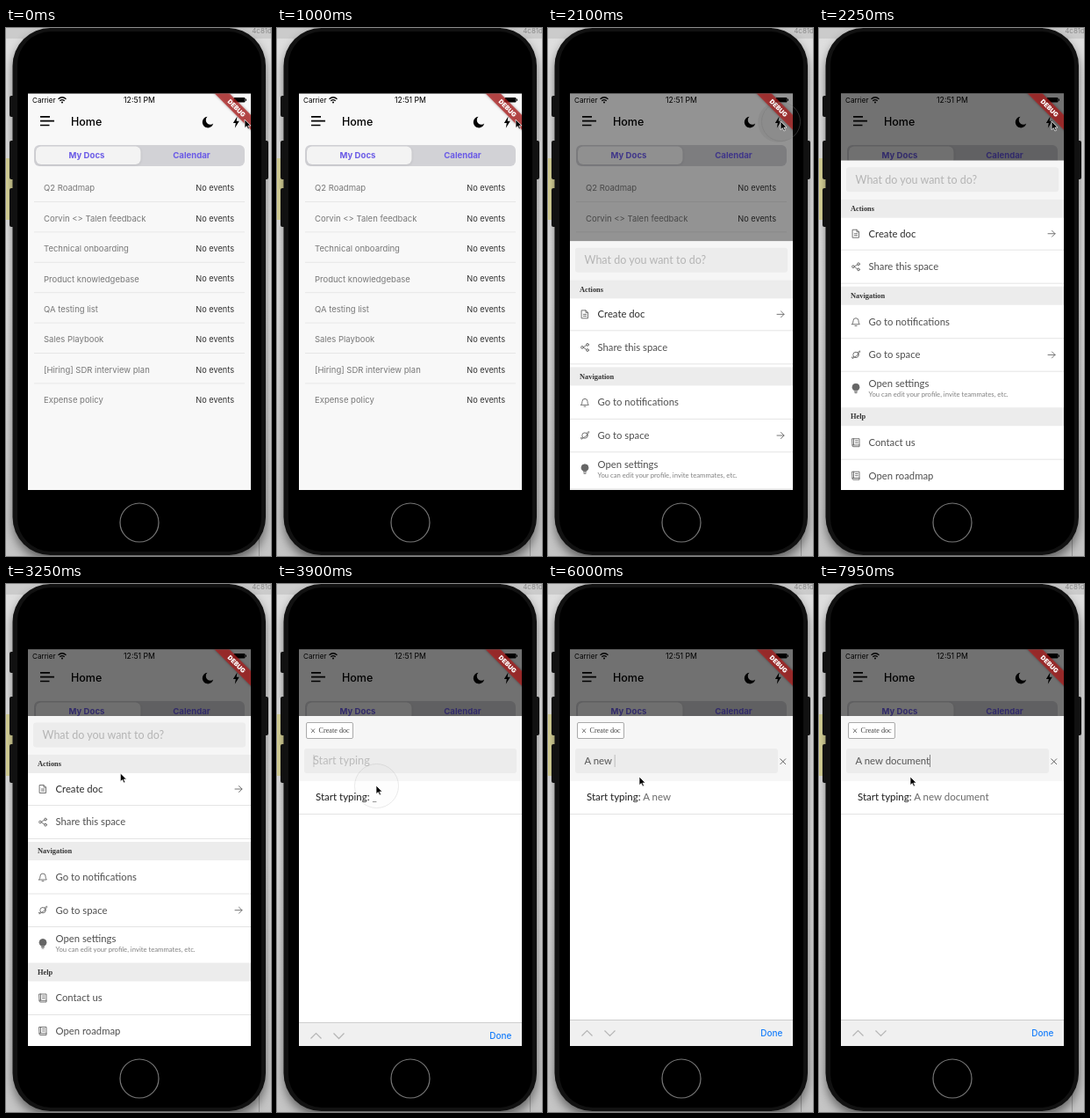
Write an HTML page that moves like this. It is 302 px wide and 600 px high and loops after 8000 ms.

```html
<!DOCTYPE html>
<html lang="en">
<head>
<meta charset="utf-8">
<title>Command sheet</title>
<style>
  html, body { margin: 0; width: 100%; height: 100%; overflow: hidden; background: #ddd; }
  svg { display: block; width: 302px; height: 600px; }
  text { font-family: Inter, sans-serif; white-space: pre; }
  .sheet text { font-family: Lato, sans-serif; }
  .sheet .serif { font-family: "Liberation Serif", serif; }
  .icon { fill: none; stroke: #666; stroke-width: .9; stroke-linejoin: round; stroke-linecap: round; }
</style>
</head>
<body>
<svg viewBox="0 0 302 600">
  <defs>
    <clipPath id="screenClip"><rect x="25" y="74.500" width="254" height="450.500"/></clipPath>
    <linearGradient id="desk" x2="0" y2="1">
      <stop offset="0" stop-color="#dedede"/><stop offset=".5" stop-color="#e2e2e2"/><stop offset="1" stop-color="#c4c4c4"/>
    </linearGradient>
    <filter id="blur" x="-20%" y="-20%" width="140%" height="140%"><feGaussianBlur stdDeviation="6"/></filter>
    <filter id="soft" x="-20%" y="-60%" width="140%" height="220%"><feGaussianBlur stdDeviation="1.5"/></filter>
  </defs>

  <!-- desktop and phone body -->
  <rect width="302" height="600" fill="url(#desk)"/>
  <rect width="302" height="12" fill="#cbcbcb"/>
  <rect y="148" width="8" height="70" fill="#dcd79b"/>
  <path d="M288.5 560V600" stroke="#999"/>
  <text x="303" y="6" font-size="8" fill="#888" text-anchor="end">4c81d</text>
  <rect x="8" y="6" width="288" height="600" rx="44" fill="#000" opacity=".5" filter="url(#blur)"/>
  <path d="M4 79q0-2 2-2h4v24H6q-2 0-2-2zM4 130q0-2 2-2h4v44H6q-2 0-2-2zM4 184q0-2 2-2h4v44H6q-2 0-2-2zM294 128h3q2 0 2 2v40q0 2-2 2h-3z" fill="#111"/>
  <rect x="7.500" y="0" width="288.500" height="599" rx="43" fill="#111"/>
  <rect x="13" y="4" width="278" height="591" rx="38" fill="#000"/>
  <circle cx="152" cy="562" r="22" fill="none" stroke="#777" stroke-width="1.2"/>

  <g clip-path="url(#screenClip)">
    <rect x="25" y="74" width="254" height="451" fill="#f8f8f8"/>
    <g id="home"></g>
    <circle id="splash" cx="262" cy="107" r="23" fill="#000"/>
    <rect id="dim" x="25" y="74" width="254" height="451"/>
    <g id="sheet" class="sheet">
      <rect x="25" y="0" width="254" height="400" fill="#fff"/>
      <g id="actions"></g>
      <g id="editor"></g>
    </g>
    <g id="accessory">
      <rect x="25" y="0" width="254" height="31" fill="#f0f0f0"/>
      <path d="M25 .5H279" stroke="#cdcdcd"/>
      <path d="M38.500 18.500l6-6 6 6M64.500 12.500l6 6 6-6" fill="none" stroke="#b5b5b5" stroke-width="1.2"/>
      <text x="267.500" y="19" font-size="10" font-weight="500" fill="#157dfb" text-anchor="end">Done</text>
    </g>
    <g transform="translate(262.800 91) rotate(45)">
      <rect x="-40" y="-6" width="80" height="12" opacity=".35" filter="url(#soft)"/>
      <rect x="-40" y="-6" width="80" height="12" fill="#b71c1c" opacity=".7"/>
      <text y="2.600" font-size="7.200" font-weight="900" fill="#fff" text-anchor="middle">DEBUG</text>
    </g>
  </g>

  <circle id="ring" fill="#888" fill-opacity=".06"/>
  <path id="cursor" d="M0 0V9.600L2.300 7.600L3.900 11L5.500 10.300L3.900 7H7Z" stroke="#fff" stroke-width=".7"/>
</svg>

<script>
const $ = id => document.getElementById(id);
const clamp = v => Math.max(0, Math.min(1, v));
const progress = (t, start, length) => clamp((t - start) / length);
const easeOut = (p, power) => 1 - (1 - p) ** power;
const easeInOut = p => p * p * (3 - 2 * p);

// Text placed by its vertical centre
const label = (x, middle, size, string, attrs = '') =>
  `<text x="${x}" y="${middle + size * .35}" font-size="${size}" ${attrs}>${string}</text>`;
const rule = (y, x1, x2, color) => `<path d="M${x1} ${y}H${x2}" stroke="${color}" stroke-width=".8"/>`;
const box = (x, y, w, h, fill, attrs = '') =>
  `<rect x="${x}" y="${y}" width="${w}" height="${h}" fill="${fill}" ${attrs}/>`;

const docs = ['Q2 Roadmap', 'Corvin &lt;&gt; Talen feedback', 'Technical onboarding', 'Product knowledgebase',
  'QA testing list', 'Sales Playbook', '[Hiring] SDR interview plan', 'Expense policy'];

$('home').innerHTML =
  label(30, 82, 8.1, 'Carrier') + label(152, 82, 8.7, '12:51 PM', 'text-anchor="middle"') +
  `<path d="M59.500 80.800q4.500-4 9 0M61.300 82.800q2.700-2.400 5.400 0" fill="none" stroke="#000" stroke-width="1.3"/>
   <circle cx="64" cy="84.500" r="1"/>` +
  box(259.5, 79, 13, 5.5, '#000', 'rx="1.300"') + box(273, 80.6, 1, 2.2, '#000') +
  `<path d="M39 100.900H50M39 105.700H55M39 110.500H49.500" stroke="#000" stroke-width="1.700"/>` +
  label(74, 107.1, 12.5, 'Home', 'font-weight="500"') +
  `<path d="M229.500 100.800A6.300 6.300 0 1 0 236.200 108.500A4.700 4.700 0 0 1 229.500 100.800Z"/>
   <path d="M263.500 100.500L258.800 108H261.800L260.800 113.800L265.800 105.800H262.700Z"/>` +
  box(32, 133, 240, 24, '#d2d2d6', 'rx="6"') +
  box(34, 135, 120, 21, '#000', 'rx="6" opacity=".08" filter="url(#soft)"') +
  box(34, 134.5, 119.5, 20.5, '#f3f3f3', 'rx="6"') +
  ['My Docs', 'Calendar'].map((s, i) =>
    label(92 + i * 119.5, 144.7, 9.6, s, 'font-weight="700" fill="#6a5ae6" text-anchor="middle"')).join('') +
  docs.map((title, i) => {
    const y = 182 + i * 34.4;
    return label(43, y, 9.5, title, 'fill="#787878"') +
      label(260, y, 9.2, 'No events', 'fill="#333" text-anchor="end"') +
      (i < docs.length - 1 ? rule(y + 15.5, 32, 272, '#e3e3e3') : '');
  }).join('');

const icons = {
  doc: '<path d="M-3.500-4.500H1L3.500-2V4.500H-3.500ZM1-4.500V-2H3.500M-1.700 0H1.700M-1.700 2H1.700"/>',
  share: '<path d="M2-2.500L-2 0L2 2.800"/><circle cx="3" cy="-3" r="1.400"/><circle cx="-3" r="1.400"/><circle cx="3" cy="3.200" r="1.400"/>',
  bell: '<path d="M-4.300 3H4.300Q3 1.800 3-1A3 3 0 0 0-3-1Q-3 1.800-4.300 3ZM-1 4.700H1"/>',
  planet: '<circle r="3.200"/><path d="M-2.600 2Q-5.500 5-4.500 2.500M2-2.600Q5.500-6 4.600-3.400Q2.500 1-3.800 4.200"/>',
  bulb: '<path d="M-2 2Q-4 .5-4-1.500A4 4 0 0 1 4-1.500Q4 .5 2 2Z" fill="#666"/><path d="M-1.500 3.500H1.500M-1 5H1"/>',
  book: '<path d="M-4-4.500H4V4.500H-3Q-4 4.500-4 3.500ZM-4 2.700H4M-2.500-4.500V2.500M-.5-2.300H2.300M-.5 0H2.300"/>'
};
const arrow = y => `<path class="icon" d="M261 ${y}H269M265.500 ${y - 3.5}L269 ${y}L265.500 ${y + 3.5}"/>`;
const section = (y, title) => box(25, y, 254, 21, '#ececec') +
  label(36, y + 10.3, 8.4, title, 'class="serif" font-weight="700" fill="#333"');
const action = (y, icon, title, { color = '#505050', more = false, iconY = y } = {}) =>
  `<g class="icon" transform="translate(42 ${iconY})">${icons[icon]}</g>` +
  label(56.5, y, 11.3, title, `fill="${color}"`) + (more ? arrow(y) : '');
const divider = y => rule(y, 25, 279, '#dedede');

// Sheet content is measured from the top of the sheet
$('actions').innerHTML =
  box(25, 0, 254, 44, '#f6f6f6') + box(31, 7.5, 242, 28, '#ececec', 'rx="3"') +
  label(41.5, 21.5, 12.5, 'What do you want to do?', 'fill="#b4b4b4"') +
  section(44, 'Actions') +
  action(83, 'doc', 'Create doc', { color: '#2c2c2c', more: true }) + divider(101.5) +
  action(120.5, 'share', 'Share this space') + divider(139.5) +
  section(143, 'Navigation') +
  action(183, 'bell', 'Go to notifications') + divider(202) +
  action(220.7, 'planet', 'Go to space', { more: true }) + divider(239.5) +
  action(253.5, 'bulb', 'Open settings', { iconY: 259 }) +
  label(56.5, 265.7, 7.7, 'You can edit your profile, invite teammates, etc.', 'fill="#808080"') +
  section(280.5, 'Help') +
  action(320.5, 'book', 'Contact us') + divider(339.5) +
  action(358, 'book', 'Open roadmap');

$('editor').innerHTML =
  box(25, 0, 254, 74, '#f6f6f6') +
  box(33.5, 7.5, 53, 18, '#fff', 'rx="1.500" stroke="#aaa"') +
  '<path d="M39 14.500L43 19M43 14.500L39 19" stroke="#555" stroke-width=".8"/>' +
  label(47.5, 16.5, 8.2, 'Create doc', 'class="serif" fill="#444"') +
  box(31, 37, 242, 28, '#ececec', 'rx="3" id="field"') +
  label(41, 51, 12.7, 'Start typing', 'fill="#bcbcbc" id="placeholder"') +
  label(41.5, 51, 11.4, '', 'fill="#555" id="input"') +
  box(42, 44, .9, 14, '#555', 'id="caret"') +
  '<path id="clear" d="M264.500 48.500L271 55M271 48.500L264.500 55" stroke="#666"/>' +
  label(44, 92.3, 11.5, 'Start typing: <tspan id="echo" fill="#686868"></tspan>', 'fill="#1c1c1c"') +
  divider(111.5);

const LOOP = 8000, FRAME = 50;
const phrase = 'A new document';
const OPEN = 2005, CREATE = 3740;
const keyTime = i => i < 6 ? 5000 + i * 170 : 6200 + (i - 6) * 190;
const cursorStops = [[1100, 1800, 265, 106], [2500, 3450, 113, 229], [4050, 4450, 104, 219]];

function cursorAt(t) {
  let x = 272, y = 104;
  for (const [start, end, toX, toY] of cursorStops) {
    const p = easeInOut(progress(t, start, end - start));
    x += (toX - x) * p;
    y += (toY - y) * p;
  }
  return [x, y];
}

const show = (id, visible) => $(id).setAttribute('display', visible ? 'inline' : 'none');
const set = (id, attrs) => Object.entries(attrs).forEach(([k, v]) => $(id).setAttribute(k, v));

function drawPointer(t) {
  const [x, y] = cursorAt(t);
  set('cursor', { transform: `translate(${x} ${y})` });
  const age = t - (t < 3000 ? 2000 : CREATE);
  const visible = age >= -100 && age < 200;
  show('ring', visible);
  if (visible) {
    const spread = Math.max(0, age);
    set('ring', {
      cx: x + .5, cy: y + .5, r: 17 + spread * .05, opacity: 1 - spread / 200,
      stroke: age > 0 ? '#777' : '#7c92dc', 'stroke-width': age > 0 ? .8 : 1.7
    });
  }
  set('splash', { opacity: .07 * progress(t, 1900, 80) * (1 - progress(t, 2050, 150)) });
}

function drawEditor(t) {
  let count = 0;
  while (count < phrase.length && t >= keyTime(count)) count++;
  const typed = phrase.slice(0, count);
  show('placeholder', !count);
  show('clear', count);
  set('field', { width: count ? 231 : 242 });
  $('input').textContent = typed;
  $('echo').textContent = typed || '_';
  const age = t - (count ? keyTime(count - 1) : CREATE);
  set('caret', {
    x: 41.5 + (count ? $('input').getComputedTextLength() : 0),
    opacity: .5 + .5 * Math.cos(age / 500 * 2 * Math.PI)
  });
}

function draw(now) {
  const t = Math.floor(now % LOOP / FRAME) * FRAME;
  const open = easeOut(progress(t, OPEN, 300), 3.68);
  const editing = t >= CREATE;
  set('sheet', { transform: `translate(0 ${525 - 375 * open})` });
  set('dim', { opacity: .54 * open });
  show('actions', !editing);
  show('editor', editing);
  const raised = easeOut(progress(t, 3750, 250), 2.5);
  set('accessory', { transform: `translate(0 ${525 - 30 * raised})` });
  if (editing) drawEditor(t);
  drawPointer(t);
}

const began = performance.now();
function tick() {
  draw(performance.now() - began);
  requestAnimationFrame(tick);
}
tick();
</script>
</body>
</html>
```
